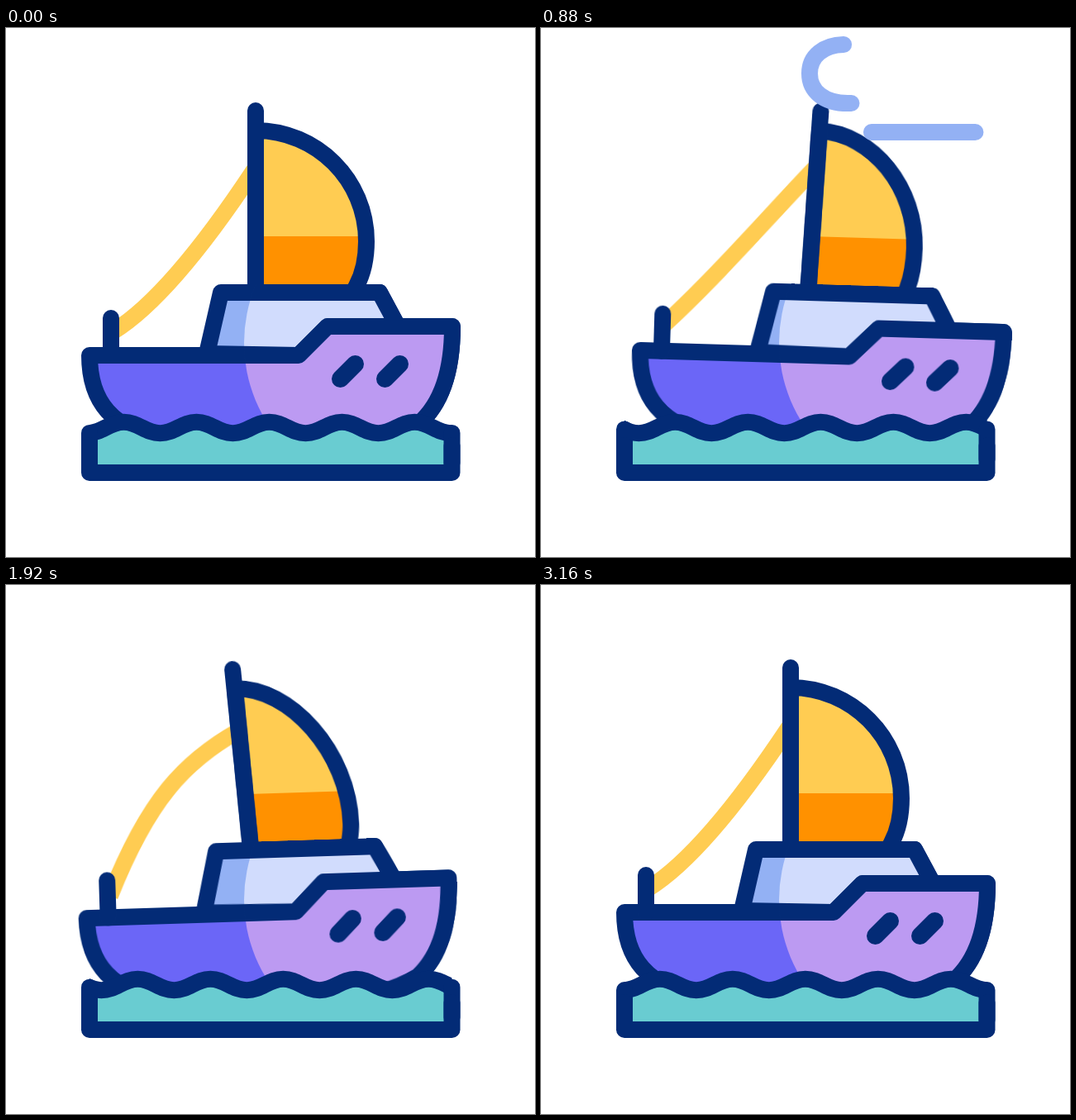
These frames come from a looping animation (640 by 640 pixels, 3.2 s). An HTML page without scripts:

```html
<!DOCTYPE html>
<html lang="en">
<head>
<meta charset="utf-8">
<title>Sailing boat</title>
<style>
html, body { margin: 0; width: 100%; height: 100%; overflow: hidden; background: #fff; }
svg { display: block; width: 100%; height: 100%; }

@property --s { syntax: "<number>"; inherits: true; initial-value: 0; }

.ink { fill: none; stroke: #032b76; stroke-width: 20; stroke-linecap: round; stroke-linejoin: round; }
.sway, .mast, .sail, .rope, .water, .wind path { animation: 3.2s linear infinite; }

/* boat drifting and rocking */
.sway { transform-origin: 320.5px 378.5px; animation-name: sway; }
@keyframes sway {
  0% { transform: translate(0, 0) rotate(0deg); animation-timing-function: ease-in-out; }
  18.4% { transform: translate(-42.3px, .3px) rotate(-3deg); animation-timing-function: cubic-bezier(.4, 0, .6, .8); }
  27.5% { transform: translate(19.3px, .5px) rotate(1.7deg); animation-timing-function: cubic-bezier(.2, .6, .5, 1); }
  37.5% { transform: translate(29px, .5px) rotate(2.3deg); animation-timing-function: cubic-bezier(.5, 0, .8, .4); }
  47.5% { transform: translate(20.5px, .5px) rotate(1.75deg); animation-timing-function: cubic-bezier(.35, .35, .6, 1); }
  55% { transform: translate(-6px, .3px) rotate(-1.7deg); animation-timing-function: ease-in; }
  60% { transform: translate(-4px, .3px) rotate(-1.8deg); animation-timing-function: cubic-bezier(.4, .1, .6, 1); }
  69.5% { transform: translate(23px, .5px) rotate(1.9deg); animation-timing-function: cubic-bezier(.4, 0, .7, .7); }
  76.25% { transform: translate(10px, .4px) rotate(.8deg); animation-timing-function: cubic-bezier(.15, .7, .4, 1); }
  100% { transform: translate(0, 0) rotate(0deg); }
}

/* rigging */
.mast { transform-origin: 302px 318px; animation-name: mast; }
.sail { animation-name: sail; }
.rope { fill: none; stroke: #ffcc52; stroke-width: 20; animation-name: rope; }
.mast, .sail, .rope { animation-timing-function: ease-in-out; }
@keyframes mast {
  0%, 100% { transform: rotate(0deg); }
  18.75% { transform: rotate(-3.8deg); }
  27.5%, 47.5% { transform: rotate(2.3deg); }
  56%, 60% { transform: rotate(-4deg); }
  76.25% { transform: rotate(-.5deg); }
}
@keyframes sail {
  0%, 100% { d: path("M302 124C376 124 436 184 436 258C436 278 432 297 424 312L420 320H302Z"); }
  18.75%, 56%, 60% { d: path("M289 124C355 124 424 205 424 292C424 298 423 305 422 311L420 320H302Z"); }
  27.5%, 47.5% { d: path("M310 124C375 126 429 190 429 263C429 279 427 296 422 311L420 320H302Z"); }
  76.25% { d: path("M300 124C372 124 426.5 194 426.5 272C426.5 286 425 299 422 311L420 320H302Z"); }
}
@keyframes rope {
  0%, 100% { d: path("M300 172C255 240 190 330 130 367"); }
  18.75%, 56%, 60% { d: path("M292 175C225 210 180 255 130 370"); }
  27.5%, 47.5% { d: path("M307 168C258 222 190 305 128 365"); }
  76.25% { d: path("M302 172C228 226 175 295 128 370"); }
}

/* --s counts wave periods gone by */
.water { animation-name: flow; }
.wave { transform: translateX(calc(var(--s) * -88px)); }
.edge { transform: translateY(calc(cos(var(--s) * 1turn - .477turn) * -6.5px)); }
@keyframes flow {
  0% { --s: 0; animation-timing-function: cubic-bezier(.333, .15, .667, .575); }
  18.75% { --s: .455; animation-timing-function: cubic-bezier(.333, .283, .667, .567); }
  27.5% { --s: .773; animation-timing-function: cubic-bezier(.333, .252, .667, .651); }
  47.5% { --s: 2.023; animation-timing-function: cubic-bezier(.333, .348, .667, .739); }
  60% { --s: 2.807; animation-timing-function: cubic-bezier(.333, .469, .667, .705); }
  76.25% { --s: 3.375; animation-timing-function: cubic-bezier(.333, .391, .667, .862); }
  100% { --s: 4; }
}

/* wind */
.wind path { fill: none; stroke: #93b1f4; stroke-width: 20; stroke-linecap: round; opacity: 0; }
.wind .curl { animation-name: curl; }
.wind .gust { animation-name: gust; }
.wind .puff { animation-name: puff; }
@keyframes curl {
  0%, 6.24% { opacity: 0; stroke-dasharray: 0px 999px; stroke-dashoffset: 0px; transform: translateX(56px); }
  6.25% { opacity: 1; stroke-dasharray: 0px 999px; stroke-dashoffset: 0px; transform: translateX(56px); }
  17.5% { stroke-dasharray: 186px 999px; stroke-dashoffset: -28px; transform: translateX(26px); }
  18.75% { stroke-dasharray: 202px 999px; stroke-dashoffset: -37px; transform: translateX(23px); }
  21.9% { stroke-dasharray: 220px 999px; stroke-dashoffset: -80px; transform: translateX(14px); }
  27.5% { stroke-dasharray: 131px 999px; stroke-dashoffset: -169px; transform: translateX(0); }
  35.6% { opacity: 1; stroke-dasharray: 0px 999px; stroke-dashoffset: -299px; transform: translateX(-18px); }
  35.61%, 100% { opacity: 0; stroke-dasharray: 0px 999px; stroke-dashoffset: -299px; transform: translateX(-18px); }
}
@keyframes gust {
  0%, 15.6% { opacity: 0; d: path("M601 126H600"); }
  15.61% { opacity: 1; d: path("M601 126H600"); }
  18.75% { d: path("M594 126H548"); }
  27.5% { d: path("M526 126H400"); }
  36% { opacity: 1; d: path("M374 126H372"); }
  36.01%, 100% { opacity: 0; d: path("M374 126H372"); }
}
@keyframes puff {
  0%, 29.7% { opacity: 0; d: path("M640 166H639"); }
  29.71% { opacity: 1; d: path("M640 166H639"); }
  38% { d: path("M622 166H526"); }
  47.5% { opacity: 1; d: path("M525 166H494"); }
  50.4% { opacity: 1; d: path("M486 166H485"); }
  50.41%, 100% { opacity: 0; d: path("M486 166H485"); }
}

.shade { --hull: #6b66f7; --cabin: #93b1f4; }
.lit { --hull: #bc9af2; --cabin: #d1dcfd; }
</style>
</head>
<body>
<svg viewBox="0 0 640 640">
  <defs>
    <linearGradient id="cloth" gradientUnits="userSpaceOnUse" x1="0" y1="0" x2="0" y2="503">
      <stop offset=".5" stop-color="#ffcc52"/>
      <stop offset=".5" stop-color="#ff9100"/>
    </linearGradient>
    <clipPath id="light"><circle cx="468" cy="381" r="180"/></clipPath>
    <clipPath id="tank"><path d="M101 455H539.5V538H101Z"/></clipPath>
    <g id="body" class="ink">
      <path style="fill:var(--cabin)" d="M243 394L260 320H452L474 361H389L354 396Z"/>
      <path style="fill:var(--hull)" d="M101 396H354L389 361H540C540 412 528 454 499 479Q480 490 452 497L200 500C126 487 101 450 101 396Z"/>
    </g>
  </defs>

  <g class="sway">
    <path class="rope" d="M300 172C255 240 190 330 130 367"/>
    <path class="sail ink" style="fill:url(#cloth)" d="M302 124C376 124 436 184 436 258C436 278 432 297 424 312L420 320H302Z"/>
    <path class="mast ink" d="M302 100V318"/>
  </g>
  <g class="shade"><g class="sway"><use href="#body"/></g></g>
  <g class="lit" clip-path="url(#light)"><g class="sway"><use href="#body"/></g></g>
  <g class="sway">
    <path class="ink" d="M127 351V396"/>
    <path class="ink" style="stroke-width:21" d="M404.5 424.5L422.5 406.5M458.5 424.5L476.5 406.5"/>
  </g>

  <g class="water">
    <g clip-path="url(#tank)">
      <path class="wave ink" style="fill:#69ccd1" d="M54.5 476.8c18 0 26 13.4 44 13.4s26-13.4 44-13.4s26 13.4 44 13.4s26-13.4 44-13.4s26 13.4 44 13.4s26-13.4 44-13.4s26 13.4 44 13.4s26-13.4 44-13.4s26 13.4 44 13.4s26-13.4 44-13.4s26 13.4 44 13.4s26-13.4 44-13.4s26 13.4 44 13.4s26-13.4 44-13.4s26 13.4 44 13.4s26-13.4 44-13.4s26 13.4 44 13.4s26-13.4 44-13.4s26 13.4 44 13.4s26-13.4 44-13.4s26 13.4 44 13.4s26-13.4 44-13.4V560H54.5Z"/>
    </g>
    <path class="edge ink" d="M101 483.5V520M539.5 483.5V520"/>
    <path class="ink" d="M101 505V538H539.5V505"/>
  </g>

  <g class="wind">
    <path class="curl" d="M545 91H371C343 91 325 77 325 55S343 20 368 20"/>
    <path class="gust" d="M601 126H600"/>
    <path class="puff" d="M640 166H639"/>
  </g>
</svg>
</body>
</html>
```
